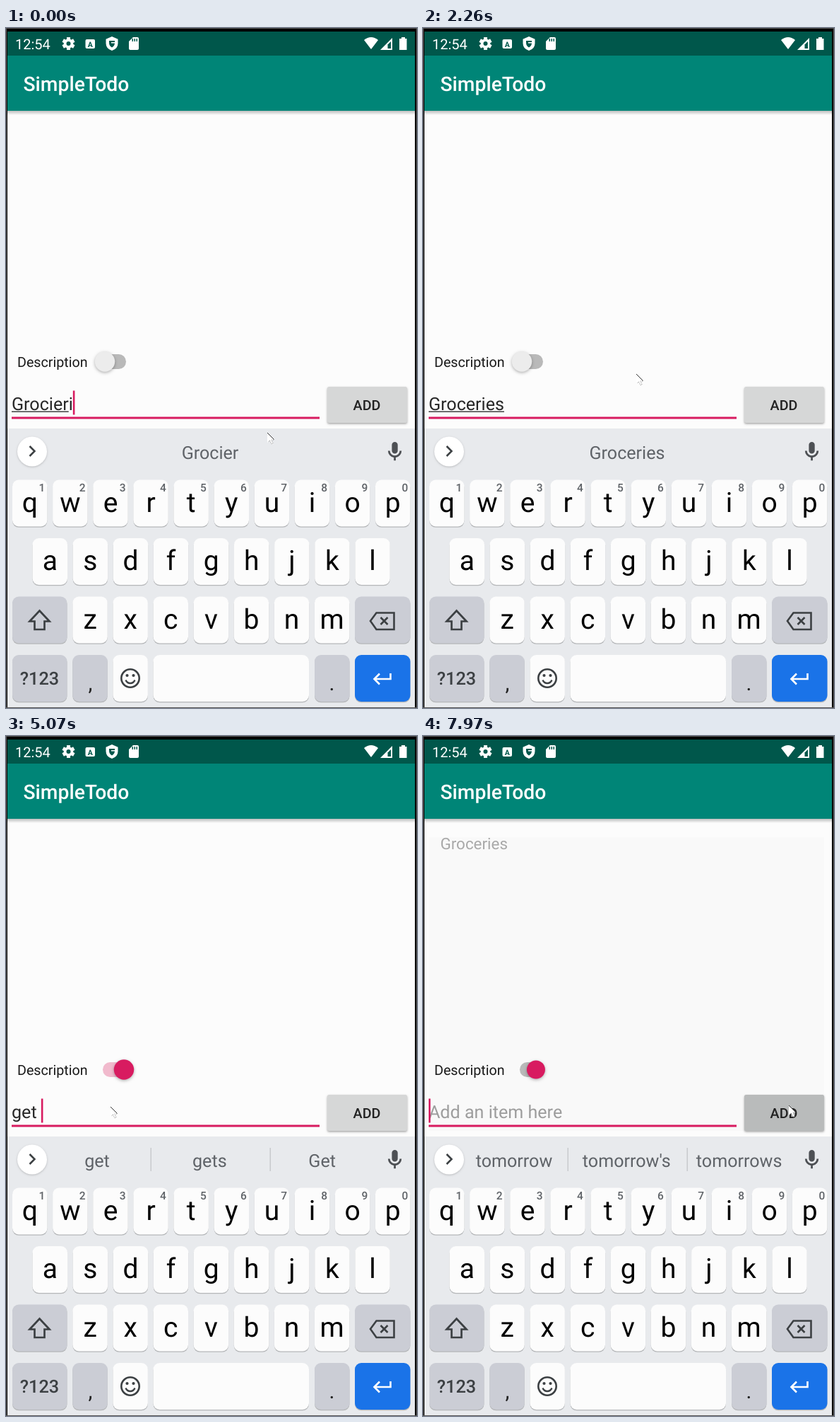
Write an HTML page with a canvas that moves like this. It is 582x961 px and loops after 8 s.

```html
<!DOCTYPE html>
<html lang="en">
<head>
<meta charset="utf-8">
<title>Todo app</title>
<style>
html, body { margin: 0; width: 100%; height: 100%; overflow: hidden; background: #000; }
canvas { display: block; }
</style>
</head>
<body>
<canvas id="stage" width="582" height="961"></canvas>
<script>
const ctx = document.getElementById('stage').getContext('2d');
ctx.textRendering = 'geometricPrecision';
const LOOP = 8000;
const PINK = '#d81b60', GREY = '#5f6368', DARK = '#3c4043';
const FIELD_X = 8, BODY = 25.1;

// The screen refreshes in bursts: [first, last, count]
const ticks = [0];
for (const [a, b, n] of [[120, 1080, 8], [1200, 1890, 6], [2260, 3170, 8], [3310, 3580, 3],
  [3860, 3860, 1], [4270, 4270, 1], [4560, 5460, 8], [5610, 6540, 8], [6670, 6810, 2],
  [7070, 7700, 5], [7850, 7970, 2]]) {
  for (let i = 0; i < n; i++) ticks.push(n > 1 ? a + (b - a) * i / (n - 1) : a);
}

const typed = [
  [0, 'Grocieri'], [120, 'Grocier'], [250, 'Grocie'], [390, 'Groci'], [530, 'Groc'],
  [660, 'Groce'], [800, 'Grocer'], [940, 'Groceri'], [1080, 'Grocerie'], [1200, 'Groceries'],
  [2900, ''], [4560, 'g'], [4685, 'ge'], [4810, 'get'], [4940, 'get '], [5070, 'get g'],
  [5200, 'get gr'], [5330, 'get gro'], [5460, 'get groc'], [5610, 'get groce'],
  [5740, 'get grocer'], [5870, 'get groceri'], [6000, 'get groceries'], [6140, 'get groceries '],
  [6270, 'get groceries t'], [6400, 'get groceries tom'], [6540, 'get groceries tomor'],
  [6670, 'get groceries tomorr'], [6810, 'get groceries tomorrow'], [7960, '']
];

const hints = [
  [0, 'Grocier'], [120, 'Grocieri'], [250, 'Grocier'], [390, 'Grocie'], [530, 'Groci'],
  [660, 'Groc|Grocery|Grocers'], [800, 'Groce|Grocery|Grocers'], [940, 'Grocer|Grocery|Grocers'],
  [1080, 'Groceri|Groceries|'], [1200, 'Groceries'], [3030, null], [4685, 'g|good|get'],
  [4810, 'ge|get|her'], [4940, 'get|gets|Get'], [5070, 'the|a|to'], [5200, 'g|good|great'],
  [5330, 'gr|great|green'], [5460, 'gro|great|grow'], [5610, 'groc|grocery|groceries'],
  [5740, 'groce|groceries|grocery'], [5870, 'grocer|groceries|grocery'],
  [6000, 'groceri|groceries|Groceries'], [6140, 'groceries'], [6270, 'and|for|from'],
  [6400, 't|to|the'], [6540, "tomo|tomorrow|tomorrow's"], [6670, "tomor|tomorrow|tomorrow's"],
  [6810, "tomorro|tomorrow|tomorrow's"], [7070, "tomorrow|tomorrow's|tomorrows"]
];

const mousePath = [
  [0, 370, 572], [1330, 370, 572], [1470, 387, 562], [1890, 304, 494], [2260, 302, 489],
  [2520, 160, 470], [2780, 160, 470], [3170, 147, 520], [3310, 147, 520], [3580, 148, 524],
  [7070, 148, 524], [7700, 518, 522], [8000, 518, 522]
];

const caretOff = [[1740, 2380], [3440, 3860], [4270, 4560], [7380, 7850]];

const clamp = v => Math.max(0, Math.min(1, v));
const at = (track, t) => track.filter(k => k[0] <= t + 1).pop();

function mouseAt(t) {
  const i = mousePath.findIndex(k => k[0] > t);
  const [t0, x0, y0] = mousePath[i - 1], [t1, x1, y1] = mousePath[i];
  const p = (t - t0) / (t1 - t0);
  return [x0 + (x1 - x0) * p, y0 + (y1 - y0) * p];
}

function rect(x, y, w, h, color) {
  ctx.fillStyle = color;
  ctx.fillRect(x, y, w, h);
}

function round(x, y, w, h, r, color) {
  ctx.fillStyle = color;
  ctx.beginPath();
  ctx.roundRect(x, y, w, h, r);
  ctx.fill();
}

function disc(x, y, r, color) {
  ctx.fillStyle = color;
  ctx.beginPath();
  ctx.arc(x, y, r, 0, Math.PI * 2);
  ctx.fill();
}

function fill(d, color) {
  ctx.fillStyle = color;
  ctx.fill(new Path2D(d));
}

function line(d, color, width) {
  ctx.strokeStyle = color;
  ctx.lineWidth = width;
  ctx.stroke(new Path2D(d));
}

function text(s, x, y, size, color, align = 'left', weight = 400) {
  ctx.font = `${weight} ${size}px Roboto, sans-serif`;
  ctx.textAlign = align;
  ctx.fillStyle = color;
  ctx.fillText(s, x, y);
}

function shadowed(blur, dy, alpha, draw) {
  ctx.save();
  ctx.shadowColor = `rgba(0,0,0,${alpha})`;
  ctx.shadowBlur = blur;
  ctx.shadowOffsetY = dy;
  draw();
  ctx.restore();
}

function statusBar() {
  rect(2, 5, 577, 34, '#00574b');
  text('12:54', 13, 30, 20, '#fff');
  // gear
  ctx.save();
  ctx.translate(88.5, 22);
  for (let i = 0; i < 6; i++) {
    ctx.rotate(Math.PI / 3);
    rect(-2.5, -9, 5, 6, '#fff');
  }
  ctx.restore();
  disc(88.5, 22, 6.8, '#fff');
  disc(88.5, 22, 3, '#00574b');
  round(112.5, 16, 13.5, 13, 2, '#fff');
  text('A', 119.2, 26.5, 10.5, '#00574b', 'center', 700);
  fill('M150 12l8.5 3.8v6q0 7.5-8.5 10.2q-8.5-2.7-8.5-10.2v-6z', '#fff');
  fill('M146 18h8v3q0 4-4 6.5q-4-2.5-4-6.5z', '#00574b');
  fill('M149 20h5v1.5h-5z', '#fff');
  fill('M180 13h6q2 0 2 2v14q0 2-2 2h-10q-2 0-2-2v-10z', '#fff');
  for (let x = 178.5; x < 186; x += 3) rect(x, 15, 1.5, 4, '#00574b');
  fill('M507 17q10-8 20 0l-10 13z', '#fff');
  fill('M530 31L547 14V31z', '#fff');
  fill('M540.5 23.5L545 19V29h-4.5z', '#00574b');
  fill('M560 13h5v2h2.5v16h-10.5v-16h3z', '#fff');
}

function appBar() {
  rect(2, 39, 577, 78, '#008577');
  const g = ctx.createLinearGradient(0, 117, 0, 123);
  g.addColorStop(0, 'rgba(0,0,0,.25)');
  g.addColorStop(1, 'rgba(0,0,0,0)');
  rect(2, 117, 577, 6, g);
  text('SimpleTodo', 24.5, 89, 28.3, '#fff', 'left', 500);
}

function newItem() {
  rect(8, 143, 560, 415, '#f9f9f9');
  text('Groceries', 24.5, 160, 22.4, '#a9a9a9');
}

function toggle(t) {
  const on = t > 2640 && t < 7850;
  const p = t < 7850 ? clamp((t - 2640) / 250) : 1 - (t - 7850) / 460;
  const x = 140 + 27 * p;
  const leaving = t >= 7850;
  text('Description', 16, 479, 19.7, '#1a1a1a');
  round(137, 461, 33, 21, 10.5, on ? '#f1bacd' : '#b9b9b9');
  if (t > 2510 && t < 2900) disc(x, 471, 25, on ? 'rgba(216,27,96,.15)' : 'rgba(0,0,0,.1)');
  shadowed(4, 1.5, 0.3, () => {
    disc(x, 471.5, leaving ? 13 : 14.2, on || leaving ? PINK : '#ececec');
  });
}

function field(t) {
  const [since, s] = at(typed, t);
  rect(FIELD_X, 549.5, 436, 3, PINK);
  ctx.font = `400 ${BODY}px Roboto, sans-serif`;
  const width = n => ctx.measureText(s.slice(0, n)).width;
  const end = width(s.length);
  if (s) {
    text(s, FIELD_X, 540, BODY, '#272727');
    // the composing underline trails one letter behind the typing
    const start = s.lastIndexOf(' ') + 1;
    const erasing = t > 100 && t < 600;
    const settled = erasing || t > since + 100 && t > 1100;
    const stop = s.length - (settled ? 0 : 1);
    if (stop > start) rect(FIELD_X + width(start), 541.5, width(stop) - width(start), 1.4, '#333');
  } else {
    text('Add an item here', FIELD_X, 540, BODY, '#9d9d9d');
  }
  if (!caretOff.some(([a, b]) => t >= a && t < b)) rect(FIELD_X + end, 512.5, 2.6, 34, PINK);
}

function addButton(t) {
  shadowed(3, 1.5, 0.35, () => round(455, 507, 113, 51, 2.5, t >= 7850 ? '#b9bbbb' : '#d6d7d7'));
  text('ADD', 511, 540, 19.7, '#222', 'center', 500);
}

function toolbarIcons() {
  ctx.lineCap = 'round';
  line('M118.5 594.5a7.2 7.2 0 1 0-14.4 0a7.2 7.2 0 1 0 14.4 0', GREY, 2.8);
  line('M117 600.5l8 8', GREY, 3.2);
  line('M190 588h15q3 0 3 3v10l-8 8h-10q-3 0-3-3v-15q0-3 3-3zM208 601h-5q-3 0-3 3v5M192.5 599q3.5 5 8 2', GREY, 2.6);
  disc(193.5, 594.5, 1.7, GREY);
  disc(202, 594.5, 1.7, GREY);
  text('GIF', 279.5, 605.5, 20.8, GREY, 'center', 900);
  line('M357 589h15q3 0 3 3v16q0 3-3 3h-15q-3 0-3-3v-16q0-3 3-3z', GREY, 2.6);
  fill('M358 588h3q3.5-5 7 0h3v5h-13z', GREY);
  line('M359.5 598h10M359.5 602h10M359.5 606h7', GREY, 2);
  rect(414.5, 583, 1.5, 31, '#c8cacd');
  for (let i = 0; i < 3; i++) disc(458.5 + 8.2 * i, 599, 2.8, GREY);
}

function suggestions(t) {
  const words = at(hints, t)[1];
  shadowed(3, 1, 0.2, () => disc(37, 598.5, 21, '#fff'));
  ctx.lineCap = 'butt';
  line(words === null ? 'M41 591l-7 7l7 7' : 'M33.5 591l7 7l-7 7', DARK, 2.5);
  if (words === null) toolbarIcons();
  else {
    const list = words.split('|');
    if (list.length > 1) {
      list.forEach((w, i) => text(w, 129 + 159.3 * i, 608.5, BODY, GREY, 'center'));
      rect(204.5, 582, 1.5, 33, '#c8cacd');
      rect(373.5, 582, 1.5, 33, '#c8cacd');
    } else text(words, 289, 608.5, BODY, GREY, 'center');
  }
  ctx.save();
  ctx.translate(534, 582.2);
  ctx.scale(1.38, 1.38);
  fill('M12 14a3 3 0 0 0 3-3V5a3 3 0 0 0-6 0v6a3 3 0 0 0 3 3zm5-3a5 5 0 0 1-10 0H5a7 7 0 0 0 6 6.9V21h2v-3.1A7 7 0 0 0 19 11z', '#4d5054');
  ctx.restore();
}

function key(x, y, w, color = '#fcfcfc') {
  round(x, y + 1.3, w, 66, 9, 'rgba(0,0,0,.22)');
  round(x, y, w, 66, 9, color);
}

function letters(row, x, y) {
  [...row].forEach((c, i) => {
    const left = x + 57.1 * i;
    key(left, y, 49.5);
    text(c, left + 24.8, y + 45, 39, '#000', 'center');
  });
}

function keyboard() {
  const soft = '#cbcdd5';
  const rowY = i => 638.5 + 82.5 * i;
  letters('qwertyuiop', 9, rowY(0));
  [...'1234567890'].forEach((c, i) => text(c, 51 + 57.1 * i, 655, 15.5, GREY, 'center', 500));
  letters('asdfghjkl', 37.5, rowY(1));
  letters('zxcvbnm', 94.3, rowY(2));
  key(9, rowY(2), 77.5, soft);
  key(494, rowY(2), 78.5, soft);
  key(9, rowY(3), 77.5, soft);
  key(94.3, rowY(3), 49.5, soft);
  key(151.4, rowY(3), 49.5);
  key(208.5, rowY(3), 220.5);
  key(437, rowY(3), 49.5, soft);
  key(494, rowY(3), 78.5, '#1a73e8');
  ctx.lineCap = 'butt';
  line('M47.5 823.5L61.5 838.5H54.5V850H40.5V838.5H33.5z', DARK, 2.7);
  line('M516 838L524.5 826.5H549.5V850H524.5zM530.5 833l10 10M540.5 833l-10 10', DARK, 2.6);
  text('?123', 47.5, 928, 25.3, DARK, 'center', 500);
  text(',', 119.5, 936, 30, '#222', 'center');
  text('.', 461.5, 936, 30, '#222', 'center');
  line('M188.7 919a12.7 12.7 0 1 0-25.4 0a12.7 12.7 0 1 0 25.4 0', DARK, 2.6);
  disc(171.5, 915, 2.1, DARK);
  disc(180.5, 915, 2.1, DARK);
  line('M169.5 921.5q2 4.5 6.5 4.5t6.5-4.5', DARK, 2.4);
  line('M544.5 912v8H522M529 912.5l-7.5 7.5l7.5 7.5', '#fff', 2.6);
}

function pointer(t) {
  const [x, y] = mouseAt(t);
  ctx.save();
  ctx.translate(Math.round(x), Math.round(y));
  fill('M0 0L10 10H6L8.5 15.5L6 16.5L3.5 11L0 14z', '#fff');
  line('M0 0L9.5 9.5', '#333', 1);
  ctx.setLineDash([1, 1.5]);
  line('M9 10H6L8 15L6 16L3.5 11L1 13', '#777', 1);
  ctx.restore();
}

function draw(t) {
  rect(0, 0, 582, 961, '#555');
  rect(1, 1, 580, 959, '#000');
  rect(2, 117, 577, 843, '#fcfcfc');
  ctx.save();
  ctx.beginPath();
  ctx.rect(2, 5, 577, 955);
  ctx.clip();
  statusBar();
  appBar();
  if (t > 7960) newItem();
  toggle(t);
  field(t);
  addButton(t);
  rect(2, 566, 577, 395, '#e8eaed');
  suggestions(t);
  keyboard();
  pointer(t);
  ctx.restore();
}

function frame() {
  const t = performance.now() % LOOP;
  draw(ticks.filter(k => k <= t).pop());
  requestAnimationFrame(frame);
}
frame();
</script>
</body>
</html>
```
